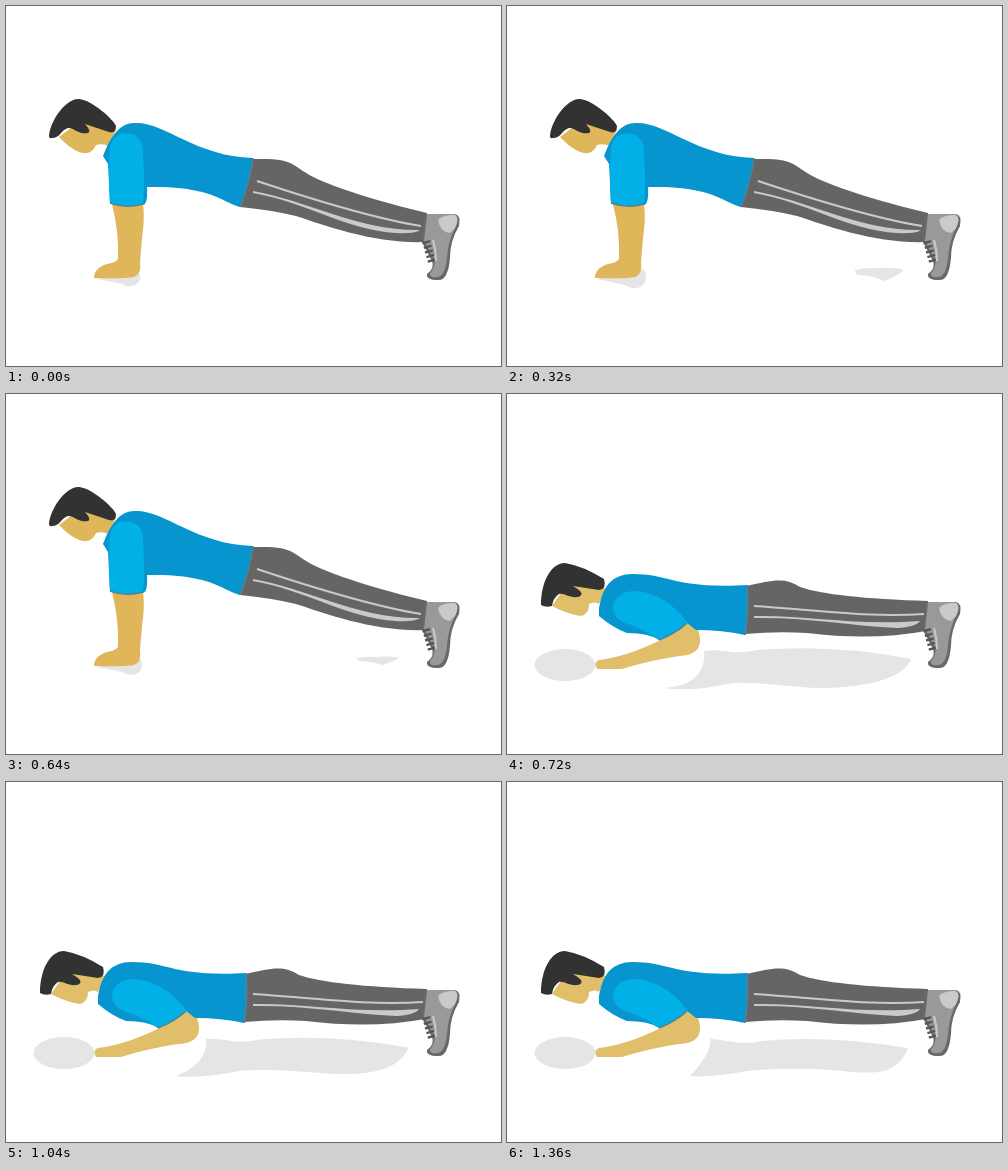
Animation, 495 px wide and 360 px high, one loop 1680 ms. Source, as an HTML page:

```html
<!DOCTYPE html>
<html lang="en">
<head>
<meta charset="utf-8">
<title>Push-up</title>
<style>
html, body { margin: 0; width: 100%; height: 100%; overflow: hidden; background: #fff; }
svg { display: block; width: 495px; height: 360px; }
.shade { fill: #e5e5e6; }
.hair { fill: #333233; }
.skin { fill: #dfb65a; }
#down .skin { fill: #e1be69; }
.shirt { fill: #0695cf; }
.sleeve { fill: #00b0e7; }
.pants { fill: #666564; }
.shoe { fill: #999; }
.sole { fill: #696969; }
.light { fill: #cacac9; }
.line { fill: none; stroke: #cacac9; stroke-width: 2; }
.seam { fill: none; stroke: #557f94; stroke-width: 1.6; }
.laces { fill: none; stroke: #565656; stroke-width: 8; stroke-dasharray: 2.4 2.4; }

/* The picture advances every 80 ms, 21 times per loop. */
#up, #down, #hand, #foot, #body { animation: 1680ms step-end infinite; }
#up { animation-name: raised; }
#down { animation-name: lowered; }
#hand { animation-name: hand; transform-origin: 90px 272px; }
#foot { animation-name: foot; transform-origin: 371px 264px; }
#body { animation-name: body; }

@keyframes raised {
  0% { visibility: visible; }
  42.857%, 100% { visibility: hidden; }
}
@keyframes lowered {
  0% { visibility: hidden; }
  42.857%, 100% { visibility: visible; }
}
@keyframes hand {
  0% { transform: scale(.9, .8); animation-timing-function: steps(4); }
  19.047% { transform: scale(1); animation-timing-function: steps(3); }
  33.333% { transform: scale(.88, 0); }
  38.095%, 100% { transform: scale(.94, .85); }
}
@keyframes foot {
  0% { transform: scale(0); animation-timing-function: steps(4); }
  19.047% { transform: scale(1); animation-timing-function: steps(3); }
  33.333% { transform: scale(0); }
  38.095%, 100% { transform: scale(.86, .65); }
}
@keyframes body {
  0%, 42.857% {
    d: path("M157 294C188 292 199 277 197 257C215 254 225 262 250 256Q330 250 404 265C395 290 340 294 310 294C270 292 240 286 220 290Q185 298 157 294Z");
    animation-timing-function: steps(8);
  }
  80.952%, 100% {
    d: path("M183 294C196 280 205 266 203 257C215 257 235 264 255 259Q320 253 401 266C390 294 365 291 345 290C310 286 270 286 240 289Q200 296 183 294Z");
  }
}
</style>
</head>
<body>
<svg viewBox="0 0 495 360">
  <g id="up">
    <path id="hand" class="shade" d="M90 273L137 263Q142 274 135 280Q126 285 118 279Z"/>
    <path id="foot" class="shade" d="M348 265Q349 262 371 262Q397 261 396 265Q388 271 377 275Q366 269 353 269Q348 269 348 265Z"/>
    <path class="skin" d="M53 131C62 141 82 157 90 139Q97 137 102 140L110 124L78 112Z"/>
    <path class="hair" d="M43 130C44 115 60 92 73 93S108 114 110 120Q110 128 103 126L79 118Q86 126 82 127C73 129 67 121 62 122C54 125 54 132 46 132Q43 133 43 130Z"/>
    <path class="skin" d="M106 198H137Q139 212 136 232L134 256Q136 268 128 271Q118 273 88 272Q88 262 101 258Q112 256 112 252Q113 226 106 198Z"/>
    <path class="pants" d="M246 153C268 153 280 152 294 163S350 190 421 207L420 236C370 238 320 220 290 210Q265 204 234 201Q242 180 246 153Z"/>
    <path class="line" d="M251 175C290 188 365 212 415 220"/>
    <path class="light" d="M247 185C300 194 352 225 414 224Q408 228 390 227C340 224 300 196 247 187Z"/>
    <path class="shirt" d="M97 150Q109 117 128 117C158 115 188 150 247 152Q244 176 234 201C214 195 205 180 141 181Q142 198 137 199L104 198L102 158Z"/>
    <path class="sleeve" d="M104 142C106 122 137 122 137 145Q139 180 137 198Q120 203 104 197Q102 170 104 142Z"/>
    <path class="seam" d="M104 197Q120 203 137 198M247 152Q244 176 234 201"/>
  </g>
  <g id="down">
    <ellipse class="shade" cx="58" cy="271" rx="30.5" ry="16"/>
    <path id="body" class="shade"/>
    <path class="skin" d="M45 212Q60 220 74 222Q82 220 82 210Q88 207 92 210L99 194L60 190Z"/>
    <path class="hair" d="M34 211C34 188 44 169 58 169Q76 172 97 185Q100 195 92 196L66 192Q80 200 71 203C61 204 58 199 52 200Q46 204 45 212Q39 214 34 211Z"/>
    <path class="pants" d="M240 192C265 186 278 183 293 193Q325 204 421 207L419 237Q365 247 300 239Q270 237 238 240Z"/>
    <path class="line" d="M247 212C300 215 360 224 417 220"/>
    <path class="light" d="M247 222C300 221 350 232 413 227Q409 233 390 234C345 232 300 223 247 224Z"/>
    <path class="skin" d="M178 228L191 236C196 250 193 261 172 262Q140 267 115 275H90Q86 268 92 266Q125 262 165 240Z"/>
    <path class="shirt" d="M92 214Q97 180 125 180C165 180 165 195 241 191Q242 216 238 241Q215 236 189 236L180 229L152 246Q142 239 120 239Q106 234 92 222Z"/>
    <path class="sleeve" d="M106 213C110 187 155 193 181 229Q168 240 152 246Q142 238 124 231Q106 226 106 213Z"/>
    <path class="seam" d="M152 246Q168 240 180 229M240 192Q242 216 238 241"/>
  </g>
  <path class="sole" d="M419 208H449Q455 209 453 220Q444 235 444 252Q442 275 432 274Q420 274 421 268Q429 262 426 255L416 236Z"/>
  <path class="shoe" d="M421 208H448Q453 209 450 220Q442 235 441 252Q439 271 431 271Q423 272 424 267Q430 260 428 253L418 235Z"/>
  <path class="light" d="M432 214Q436 209 449 209Q454 212 449 222L444 227Q434 226 432 214Z"/>
  <path class="laces" d="M420 235L426 256"/>
  <path class="line" d="M427 234Q430 244 430 255"/>
</svg>
</body>
</html>
```
